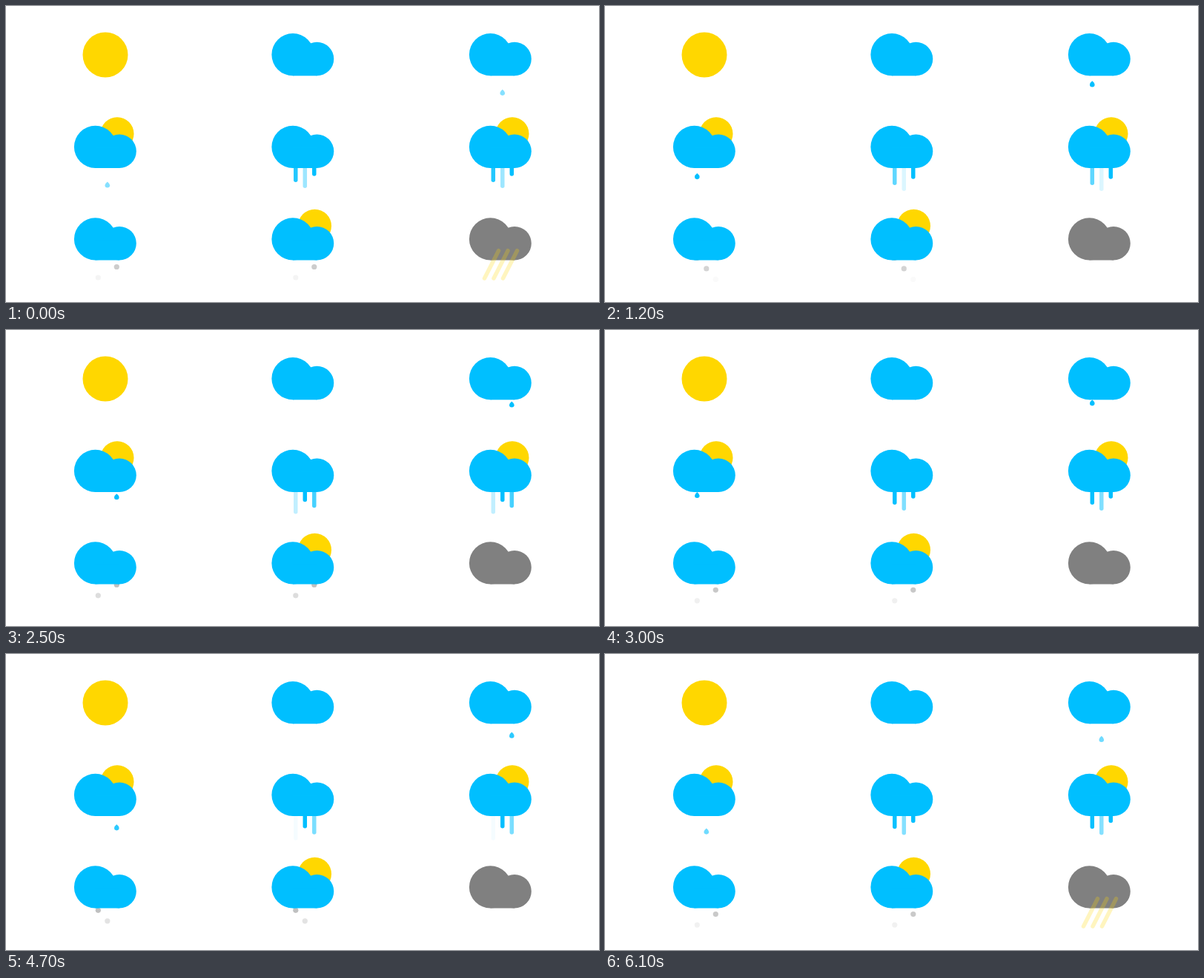
These frames come from a looping animation (800 by 400 pixels, 6200 ms). An HTML page with a canvas:

```html
<!DOCTYPE html>
<html lang="en">
<head>
<meta charset="utf-8">
<title>Weather icons</title>
<style>
  html, body { margin: 0; width: 100%; height: 100%; overflow: hidden; background: #fff; }
  canvas { display: block; width: 800px; height: 400px; }
</style>
</head>
<body>
<canvas id="stage" width="800" height="400"></canvas>
<script>
const ctx = document.getElementById('stage').getContext('2d');
const LOOP = 6200, STEP = 100;
const SKY = '#00bfff', SUN = '#ffd700', GREY = '#808080', SNOW = '#c0c0c0';
const LANES = [32.3, 44.8, 57.3];
const COLS = [92, 358.5, 625], ROWS = [37, 161.7, 286.2];

const fract = v => v - Math.floor(v);
const clamp = v => Math.max(0, Math.min(1, v));
const ramp = (v, a, b) => clamp((v - a) / (b - a));

function disc(x, y, r, color) {
  ctx.fillStyle = color;
  ctx.beginPath();
  ctx.arc(x, y, r, 0, 7);
  ctx.fill();
}

function cloud(color) {
  disc(28.5, 28.7, 28.6, color);
  disc(61, 34.5, 22.8, color);
  ctx.fillRect(28.5, 30, 32.5, 27.3);
}

function line(x1, y1, x2, y2, width, color) {
  ctx.strokeStyle = color;
  ctx.lineWidth = width;
  ctx.lineCap = 'round';
  ctx.beginPath();
  ctx.moveTo(x1, y1);
  ctx.lineTo(x2, y2);
  ctx.stroke();
}

// One drop at a time swells below the cloud, then accelerates and fades.
function drizzle(t) {
  const period = 2040;
  LANES.forEach((x, i) => {
    const p = fract((t - i * 700) / period) * period;
    if (p < 750 || p > 1430) return;
    const fall = Math.max(0, p - 975);
    const y = 52 + 9.5 * ramp(p, 750, 960) + 1.39e-4 * fall * fall;
    ctx.globalAlpha = 1 - ramp(p, 1220, 1450);
    ctx.fillStyle = SKY;
    ctx.beginPath();
    ctx.moveTo(x, y - 4.2);
    ctx.quadraticCurveTo(x + 3.3, y - 1.6, x + 3.3, y + 0.6);
    ctx.arc(x, y + 0.6, 3.3, 0, Math.PI);
    ctx.quadraticCurveTo(x - 3.3, y - 1.6, x, y - 4.2);
    ctx.fill();
  });
}

function rain(t) {
  LANES.forEach((x, i) => {
    const p = fract((t - 595) / 1028 + i / 3);
    ctx.globalAlpha = 1 - 0.97 * ramp(p, 0.33, 1);
    line(x, 44, x, 63.2 + 24.3 * p, 5.5, SKY);
  });
}

function snow(t) {
  const start = [0.897, 0.23, 0.563];
  LANES.forEach((x, i) => {
    const p = fract(t / 3084 + start[i]);
    const y = 41.8 + 43.5 * p;
    ctx.globalAlpha = 1 - ramp(y, 62, 85);
    disc(x, y, 3.6, SNOW);
  });
}

function lightning(t) {
  const p = fract((t - 1000) / 2040) * 2040 + 1000;
  const main = 0.45 * ramp(p, 1840, 1890) * (1 - ramp(p, 1890, 2130));
  const side = 0.25 * ramp(p, 1930, 2000) * (1 - ramp(p, 2050, 2130));
  [side, Math.max(main, side), side].forEach((alpha, i) => {
    const x = i * 12.5;
    ctx.globalAlpha = alpha;
    if (alpha) line(39.5 + x, 44.5, 20.5 + x, 81.8, 5.5, SUN);
  });
}

// col, row, small sun, fall, cloud colour
const ICONS = [
  [1, 0, false, null, SKY],
  [2, 0, false, drizzle, SKY],
  [0, 1, true, drizzle, SKY],
  [1, 1, false, rain, SKY],
  [2, 1, true, rain, SKY],
  [0, 2, false, snow, SKY],
  [1, 2, true, snow, SKY],
  [2, 2, false, null, GREY, lightning]
];

function draw(t) {
  ctx.clearRect(0, 0, 800, 400);
  disc(134, 66, 30.5, SUN);
  for (const [col, row, sunny, fall, color, over] of ICONS) {
    ctx.save();
    ctx.translate(COLS[col], ROWS[row]);
    if (sunny) disc(58, 11, 22.5, SUN);
    if (fall) fall(t);
    ctx.globalAlpha = 1;
    cloud(color);
    if (over) over(t);
    ctx.restore();
  }
}

function tick() {
  draw(Math.floor((performance.now() % LOOP) / STEP) * STEP);
  requestAnimationFrame(tick);
}
tick();
</script>
</body>
</html>
```
